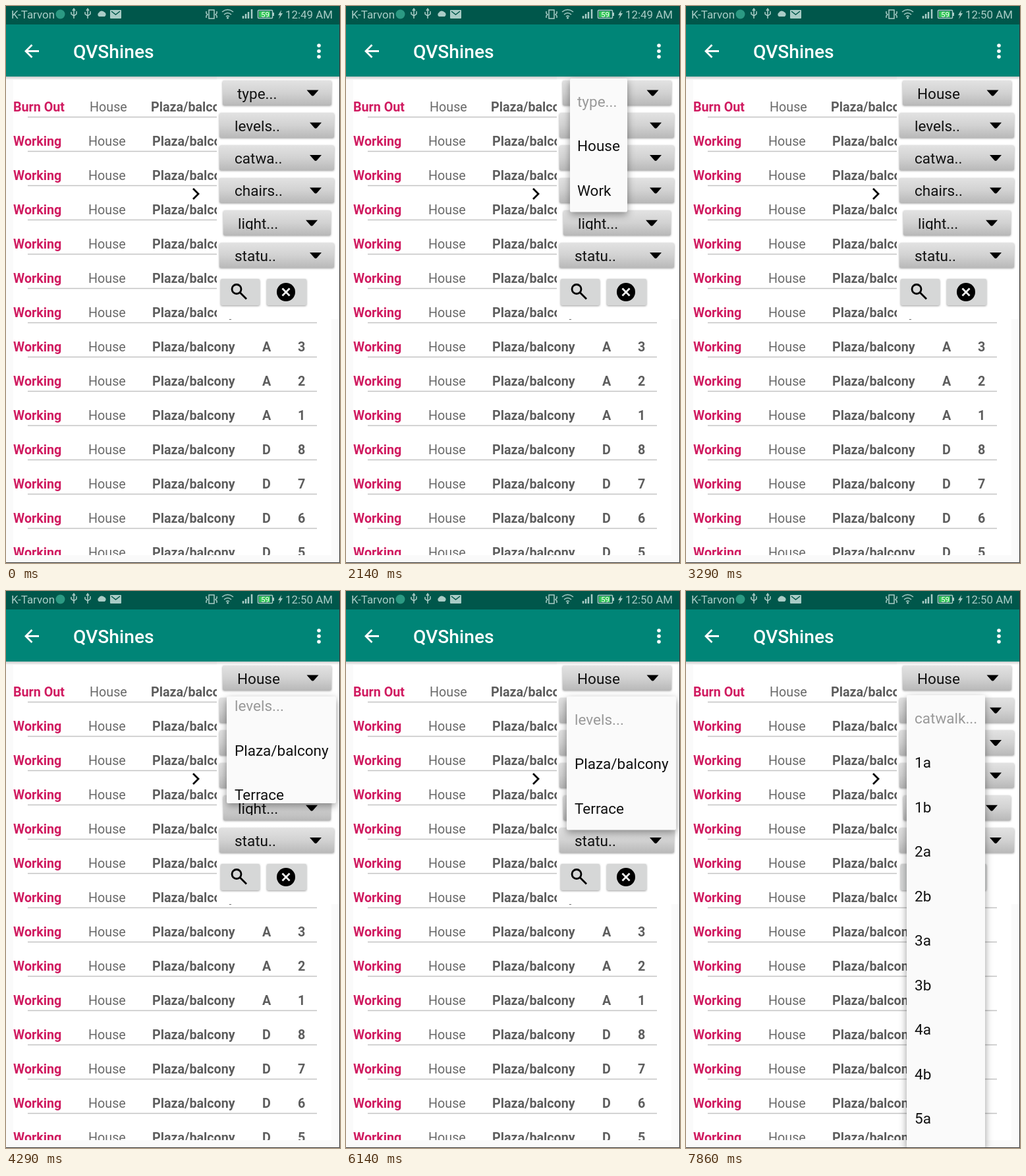
An HTML page that plays this animation: 507 px wide and 845 px high, repeating every 8000 ms.

```html
<!DOCTYPE html>
<html lang="en">
<head>
<meta charset="utf-8">
<title>Light list filters</title>
<style>
html, body { margin: 0; width: 100%; height: 100%; overflow: hidden; background: #fafafa; }
svg { display: block; }
#stage { width: 507px; height: 845px; font: 19.7px Roboto, sans-serif; fill: #6a6a6a; }
.bold { font-weight: 700; fill: #5d5d5d; }
.accent { font-weight: 700; fill: #d01b60; }
.menu { font-size: 22.5px; fill: #111; }
.hint { fill: #999; }
.status { font-size: 16.9px; fill: #a9ccc6; }
.title { font-size: 28.2px; font-weight: 500; fill: #fff; }
.line { fill: none; stroke: #000; stroke-width: 2.8; }
.thin { fill: none; stroke: #a9ccc6; stroke-width: 1.5; }
.low { filter: drop-shadow(0 1px 1.5px #0006); }
.high { filter: drop-shadow(0 4px 6px #0006); }
</style>
</head>
<body>
<svg id="stage" viewBox="0 0 507 845">
  <defs>
    <linearGradient id="grey" x2="0" y2="1">
      <stop stop-color="#e2e2e2"/><stop offset=".5" stop-color="#d2d2d2"/><stop offset="1" stop-color="#b9b9b9"/>
    </linearGradient>
    <linearGradient id="shade" x2="0" y2="1">
      <stop stop-color="#000" stop-opacity=".2"/><stop offset="1" stop-color="#000" stop-opacity="0"/>
    </linearGradient>
    <clipPath id="list"><path d="M0 107H507V833H0z"/></clipPath>
    <clipPath id="short"><path d="M320 310H507V340H320z"/></clipPath>
    <path id="usb" class="thin" d="M0 19V6M-4 9V12L0 15L4 12V8M-2 7L0 4L2 7"/>
  </defs>
  <rect width="507" height="845" fill="#fafafa"/>
  <rect x="11" y="112" width="483" height="721" fill="#fff"/>
  <g id="rows" clip-path="url(#list)"></g>
  <path class="line" d="M284 277L292 285L284 293"/>
  <rect x="320" y="107" width="187" height="368" fill="#fff"/>
  <rect y="107" width="507" height="5" fill="url(#shade)"/>
  <g id="spinners"></g>
  <g fill="#d6d7d7" class="low">
    <rect x="326" y="414" width="59" height="40" rx="2"/><rect x="396" y="414" width="60" height="40" rx="2"/>
  </g>
  <circle class="line" cx="350" cy="429.500" r="7"/>
  <path class="line" stroke-width="3" d="M355 434.500L365 444.500"/>
  <circle cx="425" cy="434" r="14" fill="#000"/>
  <path d="M419.500 428.500L430.500 439.500M430.500 428.500L419.500 439.500" stroke="#fff" stroke-width="2.700"/>
  <rect y="28" width="507" height="79" fill="#008577"/>
  <rect width="507" height="28" fill="#00574b"/>
  <path d="M50 68.500H30M39.500 59L30 68.500L39.500 78" fill="none" stroke="#fff" stroke-width="2.800"/>
  <text class="title" x="102" y="79">QVShines</text>
  <g fill="#fff"><circle cx="475" cy="60" r="2.800"/><circle cx="475" cy="68.500" r="2.800"/><circle cx="475" cy="77" r="2.800"/></g>
  <g class="status">
    <text x="8" y="19">K-Tarvon</text>
    <circle cx="82.500" cy="12.500" r="7" fill="#2b9a83"/>
    <use href="#usb" x="103"/><use href="#usb" x="124"/>
    <path d="M141 16a3.500 3.500 0 0 1 0-6a5 5 0 0 1 8-1a4 4 0 0 1 1 7z"/>
    <rect x="158" y="6" width="17" height="13" rx="1"/>
    <path d="M160 8L166.500 13L173 8" fill="none" stroke="#00574b" stroke-width="1.500"/>
    <path class="thin" d="M308 6H316V19H308zM304 8V11L306 13L304 15V18M320 8V11L318 13L320 15V18"/>
    <path class="thin" stroke-width="2" d="M328 9Q336.500 2 345 9M331 13Q336.500 8 342 13M334 16Q336.500 14 339 16"/>
    <circle cx="336.500" cy="18" r="1.500"/>
    <path d="M360 19V15M364 19V12M368 19V9M373 19V5" stroke="#a9ccc6" stroke-width="2.500"/>
    <rect class="thin" x="382.500" y="6.500" width="22" height="12" rx="1"/>
    <rect x="384" y="8" width="17" height="9" fill="#35c759"/>
    <path d="M405 10h2v5h-2zM418 6L413 14H416L414 20L420 11H417z"/>
    <text x="387" y="17" font-size="11.500" fill="#fff">59</text>
    <text id="clock" x="424" y="19"></text>
  </g>
  <g id="popups"></g>
  <path d="M506.500 0V844.500H0" fill="none" stroke="#333"/>
</svg>
<script>
const $ = id => document.getElementById(id);
const text = (x, y, s, cls = '') => `<text class="${cls}" x="${x}" y="${y}">${s}</text>`;
const FPS = 7, LOOP = 8000, ITEM = 67.5;

// Times are in steps of the 7 per second clock.
const popups = [
  { x: 340, y: 110, w: 87, tx: 351, items: ['type...', 'House', 'Work'], open: 11, grow: 4, close: 21, fade: 3 },
  { x: 335, y: 160, w: 166, tx: 347, items: ['levels...', 'Plaza/balcony', 'Terrace'], open: 27, grow: 4, close: 46, fade: 2 },
  { x: 335, y: 158, w: 119, tx: 347, open: 53, grow: 2, close: 99, fade: 2,
    items: ['catwalk...', '1a', '1b', '2a', '2b', '3a', '3b', '4a', '4b', '5a', '5b'] }
];

function row(i) {
  const y = 160 + 52 * i, first = i === 0;
  const seat = i < 10 ? ['A', 10 - i] : ['D', 18 - i];
  return text(11, y, first ? 'Burn Out' : 'Working', 'accent') +
    text(first ? 127 : 125, y, 'House') +
    text(first ? 220 : 222, y, 'Plaza/balcony', 'bold') +
    text(389, y, seat[0], 'bold') + text(443, y, seat[1], 'bold') +
    `<path d="M33 ${y + 8.5}H472" stroke="#c4c4c4" stroke-width="1.4"/>`;
}

function spinner(label, i) {
  const y = 113 + 49.3 * i;
  const [x, w, tx, ax] = i === 0 ? [329, 165, 351, 465.5] : i === 4 ? [330, 163, 352, 464] : [324, 174, 347, 470];
  return `<rect class="low" x="${x}" y="${y}" width="${w}" height="37.5" rx="2" fill="url(#grey)"/>
    <g ${i === 4 ? 'clip-path="url(#short)"' : ''}>${text(tx, y + 27.5, label, 'menu')}</g>
    <path d="M${ax - 9} ${y + 14.5}h18l-7 8q-2 2 -4 0z" fill="#000"/>`;
}

function popup(p, step) {
  const u = Math.min(1, (step - p.open) / p.grow);
  const alpha = Math.min(1, u * 2, 1 - (step - p.close + 1) / p.fade);
  if (u <= 0 || alpha <= 0) return '';
  const full = Math.min(p.items.length * ITEM, 845 - p.y);
  const h = full * (1 - (1 - u) ** 1.16);
  const shift = (h - full) / 2;   // contents stay centred in the growing window
  const items = p.items.map((s, i) =>
    text(p.tx - p.x, 42.5 + i * ITEM + shift, s, i ? 'menu' : 'menu hint')).join('');
  return `<g opacity="${alpha}"><rect class="high" x="${p.x}" y="${p.y}" width="${p.w}" height="${h}" rx="2" fill="#fafafa"/>
    <svg x="${p.x}" y="${p.y}" width="${p.w}" height="${h}">${items}</svg></g>`;
}

$('rows').innerHTML = Array.from({ length: 14 }, (_, i) => row(i)).join('');

let shown = -1;
function draw(now) {
  const step = Math.floor((now % LOOP + 5) * FPS / 1000) % 56;
  if (step !== shown) {
    shown = step;
    const labels = [step < 21 ? 'type...' : 'House', step < 46 ? 'levels..' : 'Plaza..',
      'catwa..', 'chairs..', 'light...', 'statu..'];
    $('spinners').innerHTML = labels.map(spinner).join('');
    $('popups').innerHTML = popups.map(p => popup(p, step)).join('');
    $('clock').textContent = step < 21 ? '12:49 AM' : '12:50 AM';
  }
}
const start = performance.now();
function tick() {
  draw(performance.now() - start);
  requestAnimationFrame(tick);
}
tick();
</script>
</body>
</html>
```
